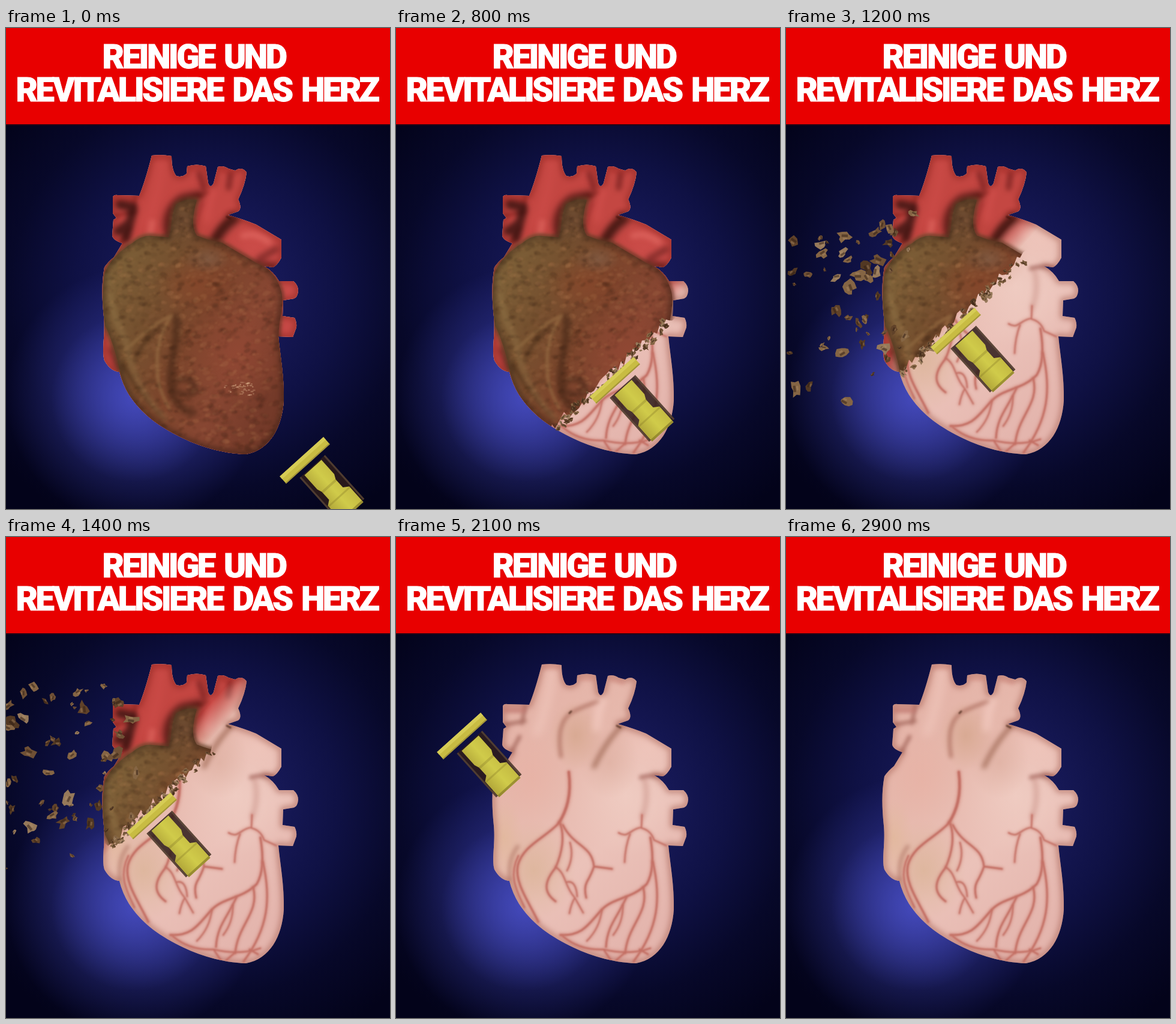
These frames come from a looping animation (640 by 800 pixels, 3000 ms). An HTML page with a canvas:

```html
<!DOCTYPE html>
<html lang="de">
<head>
<meta charset="utf-8">
<title>Herz</title>
<style>
  html, body { margin: 0; width: 640px; height: 800px; overflow: hidden; background: #03041c; }
  canvas, svg { position: absolute; left: 0; top: 0; display: block; }
  text { font: 900 56px Roboto, sans-serif; letter-spacing: -3.5px; word-spacing: 6px; text-anchor: middle; fill: #fff; stroke: #fff; stroke-width: 1; }
</style>
</head>
<body>
<canvas id="stage" width="640" height="800"></canvas>
<svg width="640" height="800" viewBox="0 0 640 800">
  <rect width="640" height="160" fill="#e80000"/>
  <rect y="160" width="640" height="2" fill="#2a0414"/>
  <text x="313" y="67">REINIGE UND</text>
  <text x="318" y="122">REVITALISIERE DAS HERZ</text>
</svg>
<script>
const W = 640, H = 800, LOOP = 3000, STEP = 100, SLOPE = 0.94;
const stage = document.getElementById('stage').getContext('2d');

const heart = new Path2D(`M243 212 Q260 210 276 213 Q276 237 284 246 Q294 249 301 242 L302 230
  Q318 225 333 230 L337 258 Q341 268 346 258 L353 231 Q362 228 371 234 L382 237 Q393 230 401 240
  Q399 260 387 285 Q394 300 387 305 L370 311 Q395 318 417 327 L459 352 L459 382 Q452 395 445 398 L430 396
  Q446 405 455 421 L479 421 Q487 428 487 437 Q486 448 480 450 L462 453 L461 479 L481 482
  Q485 490 484 498 L478 514 L454 513 C457 545 464 580 463 620 C460 664 440 702 400 709
  C360 708 320 695 290 680 C250 660 225 640 205 610 Q194 592 189 572 Q174 571 164 553
  C159 535 166 510 163 480 C160 450 159 425 164 398 Q170 389 180 381 L194 358 Q178 353 177 345
  L179 319 L184 316 L178 308 L178 281 Q180 277 186 278 L222 279 Q232 255 243 212Z`);

const crust = new Path2D(`M164 410 C170 390 190 370 210 358 Q228 343 245 346 L271 348
  C277 335 274 310 284 293 Q300 282 318 286 C312 310 308 330 318 345 Q340 354 360 357
  Q385 372 418 391 C440 400 452 415 458 435 C466 460 452 490 455 518 C462 550 465 590 463 620
  C460 664 440 702 400 709 C360 708 320 695 290 680 C250 660 225 640 205 610 Q194 592 190 572
  Q180 525 165 495 C159 460 162 430 164 410Z`);

// deterministic random numbers
function random(seed) {
  let a = seed * 2654435761 | 0;
  return () => {
    a = a + 0x6D2B79F5 | 0;
    let n = Math.imul(a ^ a >>> 15, 1 | a);
    n = n + Math.imul(n ^ n >>> 7, 61 | n) ^ n;
    return ((n ^ n >>> 14) >>> 0) / 4294967296;
  };
}

function layer(draw) {
  const c = document.createElement('canvas');
  c.width = W; c.height = H;
  draw(c.getContext('2d'));
  return c;
}

function stops(gradient, ...colors) {
  colors.forEach((c, i) => gradient.addColorStop(i / (colors.length - 1), c));
  return gradient;
}

function line(g, d, color, width, blur = 0) {
  g.filter = blur ? `blur(${blur}px)` : 'none';
  g.strokeStyle = color;
  g.lineWidth = width;
  g.lineCap = g.lineJoin = 'round';
  g.stroke(d instanceof Path2D ? d : new Path2D(d));
  g.filter = 'none';
}

function glow(g, x, y, r, color, squash = 1) {
  g.save();
  g.translate(x, y);
  g.scale(1, squash);
  g.fillStyle = stops(g.createRadialGradient(0, 0, 0, 0, 0, r), color, color.replace(/[\d.]+\)$/, '0)'));
  g.fillRect(-r, -r, 2 * r, 2 * r);
  g.restore();
}

const backdrop = layer(g => {
  g.fillStyle = stops(g.createRadialGradient(335, 440, 0, 335, 440, 440),
    '#1b1d68', '#171958', '#0f1144', '#070829', '#03031a');
  g.fillRect(0, 0, W, H);
  glow(g, 215, 612, 215, 'rgba(74,80,204,.62)');
  glow(g, 215, 615, 140, 'rgba(80,86,212,.58)');
});

const clean = layer(g => {
  g.clip(heart);
  g.fillStyle = stops(g.createLinearGradient(170, 260, 460, 620), '#e4b2a6', '#e6b8ac', '#ebc2b9', '#e4b5ad');
  g.fillRect(0, 0, W, H);
  glow(g, 385, 430, 100, 'rgba(241,208,198,.7)');
  glow(g, 420, 350, 50, 'rgba(241,200,190,.6)');
  glow(g, 225, 400, 65, 'rgba(232,176,163,.6)', 1.4);
  glow(g, 300, 330, 45, 'rgba(211,164,137,.7)', 1.3);
  glow(g, 355, 375, 50, 'rgba(215,165,148,.45)', 1.2);
  glow(g, 230, 555, 70, 'rgba(216,178,146,.65)', 1.2);
  glow(g, 180, 500, 32, 'rgba(225,184,155,.8)', 2);
  line(g, heart, 'rgba(165,95,82,.55)', 10, 5);
  line(g, 'M275 365C269 325 275 305 292 292Q318 279 337 274', 'rgba(164,98,82,.65)', 6, 3);
  line(g, 'M376 314Q350 340 330 382', 'rgba(146,90,68,.75)', 7, 4);
  line(g, 'M345 270Q336 290 334 318', 'rgba(245,205,196,.7)', 12, 6);
  line(g, 'M260 222Q256 270 235 325', 'rgba(244,203,194,.5)', 16, 7);
  line(g, 'M408 400Q430 394 447 399', 'rgba(150,82,73,.7)', 6, 3);
  line(g, 'M414 402Q422 435 410 466', 'rgba(185,120,110,.45)', 7, 4);
  line(g, 'M182 312L215 306M192 358L206 332M215 282L210 310', 'rgba(145,80,70,.65)', 6, 3);
  line(g, 'M183 288L212 288', 'rgba(192,120,112,.7)', 10, 3);
  line(g, 'M307 236L328 236M358 237L378 242M245 217L272 217', 'rgba(205,130,120,.5)', 6, 3);
  line(g, 'M289 293L292 290M368 314L374 317', '#654032', 3, 1);
  line(g, 'M190 570Q186 535 203 515', 'rgba(160,95,80,.5)', 6, 3);

  const veins = [
    ['M288 391C293 430 284 455 272 475', 6],
    ['M272 475C250 500 212 512 203 546C197 575 222 608 237 640', 4.5],
    ['M204 530C186 565 203 592 214 616', 3],
    ['M274 477C283 505 272 536 266 550C248 572 244 590 266 606', 4],
    ['M278 479C297 516 326 512 330 548Q326 560 318 574Q313 584 317 600M330 548L360 552', 4],
    ['M290 508Q297 532 285 555M266 549C284 560 280 580 298 600Q292 610 289 626M298 600L312 625M284 574Q300 570 302 598', 3],
    ['M410 462L409 483C390 485 388 502 371 492M409 484Q425 488 430 504L450 513', 3],
    ['M390 494Q382 515 381 541', 3],
    ['M424 500C430 535 428 560 418 577C394 602 360 600 342 621C322 642 312 664 274 662', 4.5],
    ['M384 599C370 632 352 645 350 682', 4],
    ['M412 583C423 625 386 645 382 692', 4],
    ['M428 540C442 600 438 650 396 706', 4],
    ['M378 612Q379 640 362 662M343 620Q340 650 318 672', 3],
    ['M278 664Q306 688 346 686Q390 696 424 684M346 686L358 704M383 690L367 704M406 686L420 694', 3.5]
  ];
  for (const [d, w] of veins) {
    line(g, d, 'rgba(202,120,108,.4)', w + 3, 2);
    line(g, d, '#c36f64', w * .75, .8);
  }
});

const red = layer(g => {
  g.drawImage(clean, 0, 0);
  g.globalCompositeOperation = 'multiply';
  g.fillStyle = '#da6262';
  g.fillRect(0, 0, W, H);
  g.globalCompositeOperation = 'source-over';
  line(g, 'M272 345C264 318 274 298 294 284L322 278', 'rgba(62,18,14,.75)', 15, 6);
  line(g, 'M312 345Q316 314 326 292', 'rgba(125,30,30,.5)', 7, 4);
  line(g, 'M380 318Q360 330 345 360', 'rgba(54,20,16,.85)', 17, 6);
  line(g, 'M190 294L212 298M187 338L204 326M212 300L200 350', 'rgba(52,18,15,.8)', 15, 4);
  line(g, 'M322 242L330 268M374 244L371 266', 'rgba(100,24,24,.65)', 9, 4);
  line(g, 'M422 384L450 368M415 392L448 394', 'rgba(92,28,26,.6)', 11, 5);
  line(g, 'M244 323L240 343M395 346Q414 338 438 356', 'rgba(238,120,112,.5)', 9, 4);
  line(g, 'M176 535L187 562', 'rgba(86,28,26,.6)', 12, 5);
  g.globalCompositeOperation = 'destination-in';
  g.drawImage(clean, 0, 0);
});

const dirty = layer(g => {
  const rnd = random(7);
  g.fillStyle = stops(g.createLinearGradient(165, 430, 465, 570), '#7d6038', '#75502f', '#7c452c', '#874632', '#743a29');
  g.fillRect(0, 0, W, H);
  glow(g, 385, 540, 90, 'rgba(150,72,52,.6)');
  glow(g, 315, 425, 70, 'rgba(142,70,42,.55)', .7);
  glow(g, 295, 320, 45, 'rgba(104,70,48,.8)', 1.2);
  glow(g, 335, 385, 38, 'rgba(130,98,76,.6)', .6);
  // mottled surface
  g.filter = 'blur(1px)';
  for (let i = 0; i < 2400; i++) {
    const x = 160 + rnd() * 305, y = 282 + rnd() * 428, r = 1 + rnd() * 3;
    g.fillStyle = rnd() < .5 ? `rgba(46,25,14,${rnd() * .2})` : `rgba(184,125,82,${rnd() * .2})`;
    g.beginPath();
    g.ellipse(x, y, r * 1.7, r, -.7 + rnd(), 0, 7);
    g.fill();
  }
  line(g, 'M284 480C290 520 265 570 278 612Q290 636 312 640', 'rgba(56,30,17,.6)', 11, 5);
  line(g, 'M208 528Q245 492 276 478Q250 515 252 560Q250 595 272 632', 'rgba(160,121,74,.5)', 5, 2);
  line(g, 'M218 545Q235 510 260 496M195 560Q225 610 258 645', 'rgba(62,38,20,.5)', 6, 3);
  line(g, 'M282 588Q310 575 316 602Q302 615 284 604', 'rgba(45,26,15,.55)', 7, 4);
  line(g, 'M170 410Q169 465 200 520Q208 590 265 650', 'rgba(166,139,88,.4)', 7, 4);
  for (let i = 0; i < 45; i++) {
    g.fillStyle = `rgba(212,168,132,${.2 + rnd() * .4})`;
    g.fillRect(362 + rnd() * 50, 588 + rnd() * 22, 2 + rnd() * 4, 2);
  }
  line(g, crust, 'rgba(38,20,14,.45)', 10, 5);
  // soft rim inside the heart
  g.globalCompositeOperation = 'destination-in';
  g.drawImage(layer(m => {
    m.clip(heart);
    line(m, crust, '#000', 6, 3);
    m.fill(crust);
  }), 0, 0);
});

// time, x of the wiper head; its y is always x + 221
const path = [[0, 498], [400, 437], [800, 365], [1200, 283], [1700, 183], [2100, 110], [2400, 35], [2700, -120], [3000, -260]];
function headX(t) {
  const i = path.findIndex(p => p[0] > t);
  const [t0, a] = path[i - 1], [t1, b] = path[i];
  return a + (b - a) * (t - t0) / (t1 - t0);
}
const edgeAt = t => headX(t) * (1 + SLOPE) + 203;

const browns = ['#6f5035', '#856544', '#523823', '#96795a', '#604229'];
function chunk(x, y, r, angle, rnd) {
  stage.save();
  stage.translate(x, y);
  stage.rotate(angle);
  stage.beginPath();
  for (let i = 0; i < 10; i++) {
    const a = i / 10 * Math.PI * 2, d = r * (.4 + rnd() * .8);
    stage.lineTo(Math.cos(a) * d * 1.25, Math.sin(a) * d * .85);
  }
  stage.fillStyle = browns[rnd() * browns.length | 0];
  stage.fill();
  stage.fillStyle = 'rgba(45,27,18,.5)';
  stage.fillRect(-r * .5, 0, r * .9, r * .35);
  stage.fillStyle = 'rgba(185,152,112,.35)';
  stage.fillRect(-r * .4, -r * .4, r * .6, r * .3);
  stage.restore();
}

function drawDebris(t) {
  for (let i = 0; i < 140; i++) {
    const rnd = random(100 + i);
    const born = 860 + i * 6, age = t - born;
    const x0 = 165 + rnd() * 60;
    const y0 = Math.max(310, edgeAt(born) - SLOPE * x0 - rnd() * 250);
    const vx = -.2 - rnd() * .35, vy = -.08 - rnd() * .45;
    const r = 3 + rnd() * 9, spin = (rnd() - .5) * .012;
    const x = x0 + vx * age - .0006 * age * age, y = y0 + vy * age;
    if (age > 0 && x > -20) chunk(x, y, r, rnd() * 6 + spin * age, rnd);
  }
}

const scratch = layer(() => {}).getContext('2d');
function drawRed(t) {
  const slope = 1.1, s = headX(t) * (1 + slope) + 221, k = 1 + slope * slope;
  const at = v => [v * slope / k, v / k];
  scratch.globalCompositeOperation = 'copy';
  scratch.drawImage(red, 0, 0);
  scratch.globalCompositeOperation = 'destination-in';
  scratch.fillStyle = stops(scratch.createLinearGradient(...at(s - 80), ...at(s - 20)), 'rgba(0,0,0,1)', 'rgba(0,0,0,0)');
  scratch.fillRect(0, 0, W, H);
  stage.drawImage(scratch.canvas, 0, 0);
}

function drawDirty(t) {
  const s = edgeAt(t), rnd = random(t + 1);
  stage.save();
  stage.beginPath();
  stage.moveTo(100, 0);
  for (let x = 100; x <= 520; x += 5) stage.lineTo(x, s - SLOPE * x + (rnd() - .5) * 20);
  stage.lineTo(520, 0);
  stage.clip();
  stage.drawImage(dirty, 0, 0);
  stage.restore();
  for (let i = 0; i < 110; i++) {
    const x = 160 + rnd() * 305, y = s - SLOPE * x - 6 + rnd() * 20, r = 2 + rnd() * 4;
    if (stage.isPointInPath(crust, x, y)) chunk(x, y, r, rnd() * 6, rnd);
  }
}

function box(color, x, y, w, h) {
  stage.fillStyle = color;
  stage.fillRect(x, y, w, h);
}

function drawWiper(t) {
  const x = headX(t);
  stage.save();
  stage.translate(x, x + 221);
  stage.rotate(-42 * Math.PI / 180);
  box('rgba(46,29,26,.85)', -26, 16, 57, 98);
  box('rgba(105,84,62,.6)', -26, 16, 3, 98);
  box('rgba(105,84,62,.6)', 28, 16, 3, 98);
  stage.fillStyle = stops(stage.createLinearGradient(-22, 0, 28, 0), '#b3a83a', '#d0cb4a', '#c4ba42');
  stage.beginPath();
  [[-17, 18], [21, 18], [21, 50], [17, 58], [17, 76], [26, 82], [26, 117], [-22, 117], [-22, 82], [-14, 76], [-14, 58], [-17, 50]]
    .forEach(p => stage.lineTo(...p));
  stage.fill();
  box('rgba(126,112,35,.3)', -14, 57, 31, 4);
  box('rgba(126,112,35,.3)', -22, 82, 48, 3);
  box('rgba(126,112,35,.6)', -22, 113, 48, 4);
  box('#c8bc43', -49, -8, 98, 16);
  box('#d6cc55', -49, -8, 98, 6);
  box('#a39438', -49, 6, 98, 2);
  stage.restore();
}

function render(t) {
  stage.drawImage(backdrop, 0, 0);
  stage.drawImage(clean, 0, 0);
  drawRed(t);
  drawDirty(t);
  drawDebris(t);
  drawWiper(t);
}

let shown = -1;
function tick() {
  const t = Math.floor(performance.now() % LOOP / STEP) * STEP;
  if (t !== shown) render(shown = t);
  requestAnimationFrame(tick);
}
tick();
</script>
</body>
</html>
```
